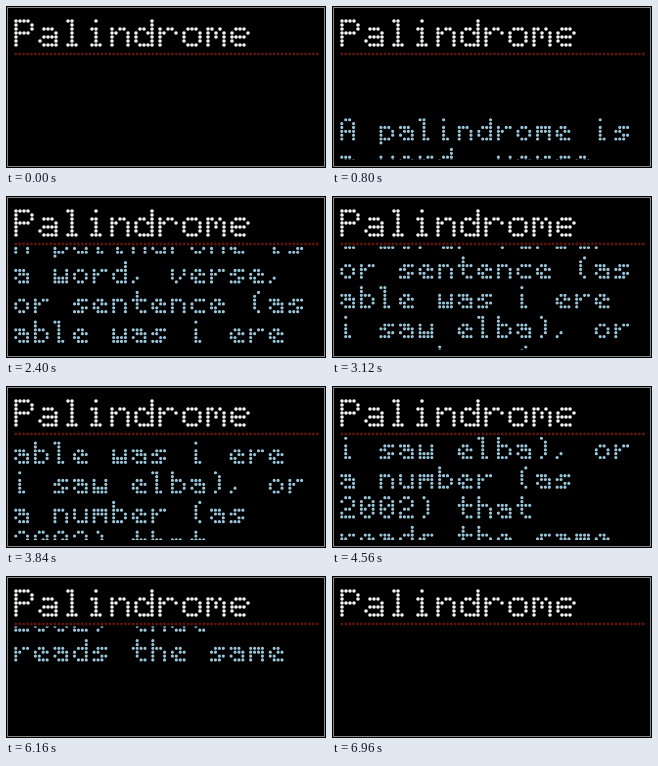
These frames come from a looping animation (320x162 px, 7040 ms). An HTML page:

```html
<!DOCTYPE html>
<html lang="en">
<head>
<meta charset="utf-8">
<title>Palindrome</title>
<style>
html, body { margin: 0; width: 100%; height: 100%; overflow: hidden; background: #000; }
svg { display: block; width: 100%; height: 100%; }
</style>
</head>
<body>
<svg viewBox="0 0 320 162" role="img" aria-label="Palindrome: a scrolling dot matrix definition">
  <clipPath id="window"><rect x="4" y="50.5" width="312" height="103.5"/></clipPath>
  <rect width="320" height="162" fill="#000"/>
  <rect x="1.5" y="1.5" width="317" height="159" fill="none" stroke="#868686"/>
  <path id="rule" fill="#5e160c"/>
  <path id="title" fill="#f4f4f4"/>
  <g clip-path="url(#window)"><path id="body" fill="#9bc6da"/></g>
</svg>
<script>
const FRAME = 80, FRAMES = 88;
const COL = 3.915, ROW = 3.85, LEFT = 9.8;
const LINE_HEIGHT = 29.7, FIRST_TOP = 152.1, SCROLL_STEP = 3.836;

// Glyph rows are separated by slashes; '#' is a lit dot.
const LARGE = {
  P: '####./#...#/#...#/####./#..../#..../#....',
  a: '//.###./....#/.####/#...#/.####',
  l: '.##../..#../..#../..#../..#../..#../.###.',
  i: '..#..//.##../..#../..#../..#../.###.',
  n: '//#.##./##..#/#...#/#...#/#...#',
  d: '....#/....#/.##.#/#..##/#...#/#...#/.####',
  r: '//#.##./##..#/#..../#..../#....',
  o: '//.###./#...#/#...#/#...#/.###.',
  m: '//##.#./#.#.#/#.#.#/#...#/#...#',
  e: '//.###./#...#/####./#..../.###.'
};
const SMALL = {
  A: '.##./#..#/#..#/####/#..#/#..#',
  a: '//###./.###/#..#/.###',
  b: '#/#/###./#..#/#..#/###.',
  c: '//.###/#.../#.../.###',
  d: '...#/...#/.###/#..#/#..#/.###',
  e: '//.##./#.##/##../.###',
  h: '#/#/###./#..#/#..#/#..#',
  i: '.#..//.#../.#../.#../.##.',
  l: '##../.#../.#../.#../.#../.##.',
  m: '//####/####/#..#/#..#',
  n: '//###./#..#/#..#/#..#',
  o: '//.##./#..#/#..#/.##.',
  p: '//###./#..#/#..#/###./#...',
  r: '//#.##/##../#.../#...',
  s: '//.###/##../..##/###.',
  t: '.#../.#../####/.#../.#../..##',
  u: '//#..#/#..#/#..#/.###',
  v: '//#..#/#..#/#.#./.#..',
  w: '//#..#/#..#/####/####',
  0: '.##./#..#/#.##/##.#/#..#/.##.',
  2: '.##./#..#/...#/.##./#.../####',
  '(': '..#./.#../.#../.#../.#../..#.',
  ')': '.#../..#./..#./..#./..#./.#..',
  ',': '////.#../#...'
};
const LINES = [
  'A palindrome is', 'a word, verse,', 'or sentence (as', 'able was i ere',
  'i saw elba), or', 'a number (as', '2002) that', 'reads the same'
];

const body = document.getElementById('body');
const draw = (id, d) => document.getElementById(id).setAttribute('d', d);

const dot = (x, y, r) =>
  `M${(x - r).toFixed(2)} ${y.toFixed(2)}a${r} ${r} 0 1 0 ${2 * r} 0a${r} ${r} 0 1 0 ${-2 * r} 0`;

// Returns the lit cells of a text as [column, row] pairs.
function cells(text, font, advance) {
  const lit = [];
  [...text].forEach((char, i) => {
    (font[char] || '').split('/').forEach((line, row) => {
      [...line].forEach((cell, col) => {
        if (cell === '#') lit.push([i * advance + col, row]);
      });
    });
  });
  return lit;
}

draw('rule', Array.from({ length: 78 }, (_, i) => dot(LEFT + i * COL, 48, 1.4)).join(''));
draw('title', cells('Palindrome', LARGE, 6)
  .map(([col, row]) => dot(10 + col * 4, 15 + row * 4, 1.8)).join(''));
draw('body', LINES.flatMap((text, i) => cells(text, SMALL, 5).map(([col, row]) =>
  dot(LEFT + col * COL, FIRST_TOP + i * LINE_HEIGHT + row * ROW, 1.6))).join(''));

// The loop opens on an empty window, then the text climbs in equal steps.
function update(now) {
  const tick = Math.floor(now / FRAME) % FRAMES;
  body.setAttribute('visibility', tick ? 'visible' : 'hidden');
  body.setAttribute('transform', `translate(0 ${-tick * SCROLL_STEP})`);
}

const start = performance.now();
function loop() {
  update(performance.now() - start);
  requestAnimationFrame(loop);
}
update(0);
requestAnimationFrame(loop);
</script>
</body>
</html>
```
